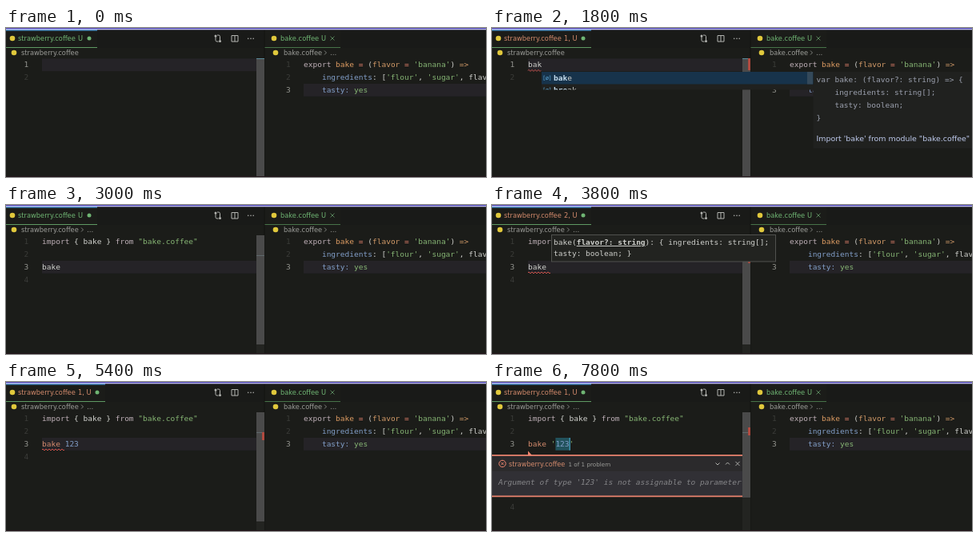
An HTML page for the animation above (8000 ms loop, 600 by 187 pixels).

```html
<!DOCTYPE html>
<html lang="en">
<head>
<meta charset="utf-8">
<title>Typed CoffeeScript editor</title>
<style>
html, body { margin: 0; width: 100%; height: 100%; overflow: hidden; background: #1b1c19; }
svg { display: block; }
text { white-space: pre; font: 8.3px "DejaVu Sans", sans-serif; }
.mono { font: 9.52px "DejaVu Sans Mono", monospace; }
</style>
</head>
<body>
<svg id="stage" width="600" height="187" viewBox="0 0 600 187"></svg>
<script>
const stage = document.getElementById('stage');
const LOOP = 8000, STEP = 200, LINE = 15.8, CHAR = 5.73;
const BG = '#1b1c19', FG = '#cfd0cc', GREEN = '#6fb573', RED = '#f08670', SALMON = '#d38a6c',
  DIM = '#9b9c98', FAINT = '#3b3c39', BLUE = '#829fc9', STR = '#86b574', ORANGE = '#d29a68',
  KEY = '#bfb0b8', CYAN = '#48b4d8', YELLOW = '#e0c83c';

const esc = s => s.replace(/&/g, '&amp;').replace(/</g, '&lt;');
const rect = (x, y, w, h, fill, extra = '') =>
  `<rect x="${x}" y="${y}" width="${w}" height="${h}" fill="${fill}" ${extra}/>`;
const dot = (x, y, r, fill) => `<circle cx="${x}" cy="${y}" r="${r}" fill="${fill}"/>`;
const path = (d, stroke, width = 1) =>
  `<path d="${d}" fill="none" stroke="${stroke}" stroke-width="${width}"/>`;
const label = (x, y, s, fill, extra = '') =>
  `<text x="${x}" y="${y}" fill="${fill}" ${extra}>${esc(s)}</text>`;
// Monospaced text from alternating colours and strings
function code(x, y, ...parts) {
  let spans = '';
  for (let i = 0; i < parts.length; i += 2)
    spans += `<tspan fill="${parts[i]}">${esc(parts[i + 1])}</tspan>`;
  return `<text class="mono" x="${x}" y="${y}">${spans}</text>`;
}
const lineY = (n, scroll = 0) => 49.4 + (n - 1) * LINE - scroll;
const lineNumber = (x, y, n, active) => code(x, y, active ? '#94958f' : FAINT, String(n));
const highlight = (x, y, w) => rect(x, y - 11, w, LINE, '#252327');
const squiggle = (x, y, chars) =>
  path(`M${x} ${y}` + 'q1 -2 2 0t2 0'.repeat(Math.round(chars * CHAR / 4)), '#e0594f', .9);
const chevron = (x, y, d = 1) => path(`M${x - 2.5} ${y + d}l2.5 ${-2.5 * d}l2.5 ${2.5 * d}`, '#b4b5b1');
const cross = (x, y, r, c) => path(`M${x - r} ${y - r}l${2 * r} ${2 * r}m0 ${-2 * r}l${-2 * r} ${2 * r}`, c, .9);
const crumbArrow = x => path(`M${x} 28.5l2.5 2.5l-2.5 2.5`, '#8b8c88', .9);

function state(t) {
  const typed = t < 1000 ? '' : t < 1400 ? 'b' : t < 1600 ? 'ba' : t < 2000 ? 'bak' : 'bake';
  const digits = t < 4200 ? 0 : Math.min(3, 1 + Math.floor((t - 4200) / 200));
  return {
    typed, digits,
    imported: t >= 2200,
    scroll: t >= 2200 && t < 2800 ? LINE : 0,
    errors: t >= 3800 && t < 5000 ? 2 : t >= 5000 || (t >= 1400 && t < 2200) ? 1 : 0,
    list: t >= 1200 && t < 2000,
    docs: t >= 1600 && t < 2000,
    signature: t >= 3600 && t < 5400,
    panel: t >= 5800,
    selected: t >= 6800,
    quoted: t >= 7400,
    symbol: t >= 6200 && t < 7600,
    stale: t >= 7600,
    caret: (t >= 200 && t < 600) || (t >= 5600 && t < 5800) || (t >= 6200 && t < 6600)
  };
}

function rightPane() {
  return rect(323, 2, 277, 185, BG) + rect(323, 2, 277, 23, '#191a18') + rect(323, 3, 95, 21, BG) +
    rect(323, 24, 95, 1, '#477349') + rect(322.5, 2, 1, 185, '#121310') +
    dot(335, 13, 3.3, YELLOW) + label(343, 16, 'bake.coffee', GREEN) + label(394, 16, 'U', GREEN) +
    cross(408, 13, 2.5, '#5d8d60') +
    dot(337, 31, 3.3, YELLOW) + label(347, 34, 'bake.coffee', DIM) + crumbArrow(398) + label(405, 34, '…', DIM) +
    highlight(372, lineY(3), 228) + [1, 2, 3].map(n => lineNumber(350, lineY(n), n, n === 3)).join('') +
    code(372, lineY(1), KEY, 'export ', '#dc9b62', 'bake ', RED, '= ', FG, '(', ORANGE, 'flavor ',
      RED, '= ', STR, "'banana'", FG, ') ', ORANGE, '=>') +
    code(372, lineY(2), BLUE, '    ingredients', FG, ': [', STR, "'flour'", FG, ', ', STR, "'sugar'", FG, ', flavor]') +
    code(372, lineY(3), BLUE, '    tasty: ', STR, 'yes');
}

function leftHeader(s) {
  const color = s.errors ? SALMON : GREEN, width = s.errors ? 124 : 114;
  let out = rect(0, 2, 322, 23, '#191a18') + rect(0, 2, width, 22, BG) + rect(0, 24, width, 1, '#5f9a63') +
    rect(0, 2, width, 1.5, '#3f8fc8') +
    dot(8, 13, 3.3, YELLOW) + label(15, 16, 'strawberry.coffee', color) +
    label(90, 16, s.errors ? s.errors + ', U' : 'U', color) + dot(s.errors ? 114 : 104, 13, 2.5, GREEN) +
    dot(10, 31, 3.3, YELLOW) + label(19, 34, 'strawberry.coffee', DIM);
  if (s.imported) out += crumbArrow(94) + label(101, 34, s.symbol ? '{} "strawberry.coffee"' : '…', DIM);
  const icon = '#b3b4b0';
  return out + path('M262 11v4.5q0 1.5 2 1.5h1.5M267.5 15v-4.5q0 -1.5 -2 -1.5h-1.5', icon) +
    dot(262, 10, 1.5, icon) + dot(267.5, 16.5, 1.5, icon) +
    path('M282 9.5h8v7.5h-8zM286 9.5v7.5', icon) +
    [302.7, 306, 309.2].map(x => dot(x, 13.3, .8, icon)).join('');
}

function leftCode(s) {
  const y = n => lineY(n, s.scroll), current = s.imported ? 3 : 1, base = y(current);
  let out = s.selected ? '' : highlight(45, base, 268);
  for (let n = 1; n <= (s.imported ? 4 : 2); n++)
    out += lineNumber(22.5, n === 4 && s.panel ? 160 : y(n), n, n === current);
  if (!s.imported) {
    out += code(45, base, FG, s.typed);
    if (s.errors) out += squiggle(45, base + 4, s.typed.length);
  } else {
    out += code(45, y(1), KEY, 'import ', FG, '{ bake } ', KEY, 'from ', STR, '"bake.coffee"');
    if (s.selected) out += rect(45 + CHAR * (s.quoted ? 6 : 5), base - 11, CHAR * 3, LINE, '#22525c');
    const quote = s.quoted ? "'" : '';
    out += code(45, base, s.digits ? SALMON : FG, 'bake ', STR, quote, BLUE, '123'.slice(0, s.digits), STR, quote);
    if (s.errors && !s.quoted) out += squiggle(45, base + 4, 5);
  }
  if (s.caret || s.selected) {
    const column = s.imported ? 8 + (s.quoted ? 1 : 0) : 0;
    out += rect(45 + column * CHAR, base - 11, 1.2, LINE, CYAN);
  }
  return `<svg y="38" width="322" height="149" viewBox="0 38 322 149">${out}</svg>`;
}

function scrollbar(s) {
  const top = s.scroll ? 52 : 38;
  const bottom = s.panel ? 145 : s.imported && !s.scroll ? 175 : 187;
  const mark = s.imported ? 63 : 38;
  return rect(313, 38, 10, 149, '#232421') + rect(313, top, 10, bottom - top, '#4a4a4a') +
    rect(313, mark, 10, 1, s.imported ? '#5f696c' : '#5b8b9a') +
    (s.errors ? rect(320, s.panel ? 57 : mark, 3, s.imported ? 10 : 15, '#b04a40') : '');
}

function suggestions(s) {
  const n = s.typed.length, bold = word =>
    `<tspan font-weight="bold" fill="#c5def0">${word.slice(0, n)}</tspan>${word.slice(n)}`;
  const row = (word, y) => label(64, y - 1, '[ø]', '#5da9d8', 'style="font-size:7px"') +
    `<text class="mono" x="77" y="${y}" fill="${FG}">${bold(word)}</text>`;
  let out = `<svg x="62" y="55" width="340" height="22.5" viewBox="62 55 340 22.5">` +
    rect(62, 55, 340, 23, '#20211f') + rect(62, 55, 340, 15.5, '#17334b') +
    row('bake', 66) + row('break', 81) + rect(394, 55, 7, 15.5, '#34495a') + '</svg>';
  if (s.docs) {
    out += rect(401.5, 55, 199, 96, '#20211f') +
      ['var bake: (flavor?: string) => {', '    ingredients: string[];', '    tasty: boolean;', '}']
        .map((line, i) => code(405.5, 68.2 + i * LINE, '#9ba0ae', line)).join('') +
      label(405.5, 142, 'Import \'bake\' from module "bake.coffee"', '#bfcbee', 'style="font-size:9.43px"');
  }
  return out;
}

function signature(s) {
  const x = 74 + s.digits * CHAR;
  return rect(x + .5, 37.5, 280, 33.5, '#222320', 'stroke="#50514e"') +
    `<text class="mono" x="${x + 3}" y="50" fill="${FG}">bake(<tspan font-weight="bold" ` +
    `text-decoration="underline">flavor?: string</tspan>): { ingredients: string[];</text>` +
    code(x + 3, 64.3, FG, 'tasty: boolean; }');
}

function problemPanel(s) {
  const message = "Argument of type '123' is not assignable to parameter of type 'string'.";
  return rect(0, 92, 313, 52, '#313035') + rect(0, 92, 313, 20, '#2b2a2c') +
    rect(0, 91.2, 313, 1.7, RED) + rect(0, 142.6, 313, 1.7, RED) +
    `<path d="M45 86.5v5.5h5z" fill="${RED}"/>` +
    `<circle cx="13" cy="102.5" r="4.2" fill="none" stroke="${RED}"/>` + cross(13, 102.5, 1.7, RED) +
    label(21, 105.5, 'strawberry.coffee', SALMON, 'style="font-size:8.15px"') +
    label(95.5, 105.5, '1 of 1 problem', DIM, 'style="font-size:7.2px"') +
    chevron(282, 102.5, -1) + chevron(294.5, 102.5) + cross(307, 102.5, 2.6, '#b4b5b1') +
    `<svg width="312" height="187"><text class="mono" x="8" y="129.2" fill="${s.stale ? '#858588' : FG}" ` +
    `${s.stale ? 'style="font-style:italic"' : ''}>${message}</text></svg>` +
    (s.stale ? '' : rect(8, 140.4, 211, 2.2, '#4a494c'));
}

function draw(t) {
  const s = state(t);
  stage.innerHTML = rect(0, 0, 600, 187, BG) + rightPane() + leftHeader(s) + leftCode(s) +
    (s.panel ? problemPanel(s) : '') + scrollbar(s) +
    (s.list ? suggestions(s) : '') + (s.signature ? signature(s) : '') +
    rect(0, 0, 600, 1, '#4a43b0') + rect(0, 1, 600, 1.3, '#bcb9f2') + rect(0, 186, 600, 1, '#23151a');
}

let shown = -1;
function tick() {
  const t = Math.floor(performance.now() % LOOP / STEP) * STEP;
  if (t !== shown) draw(shown = t);
  requestAnimationFrame(tick);
}
tick();
</script>
</body>
</html>
```
